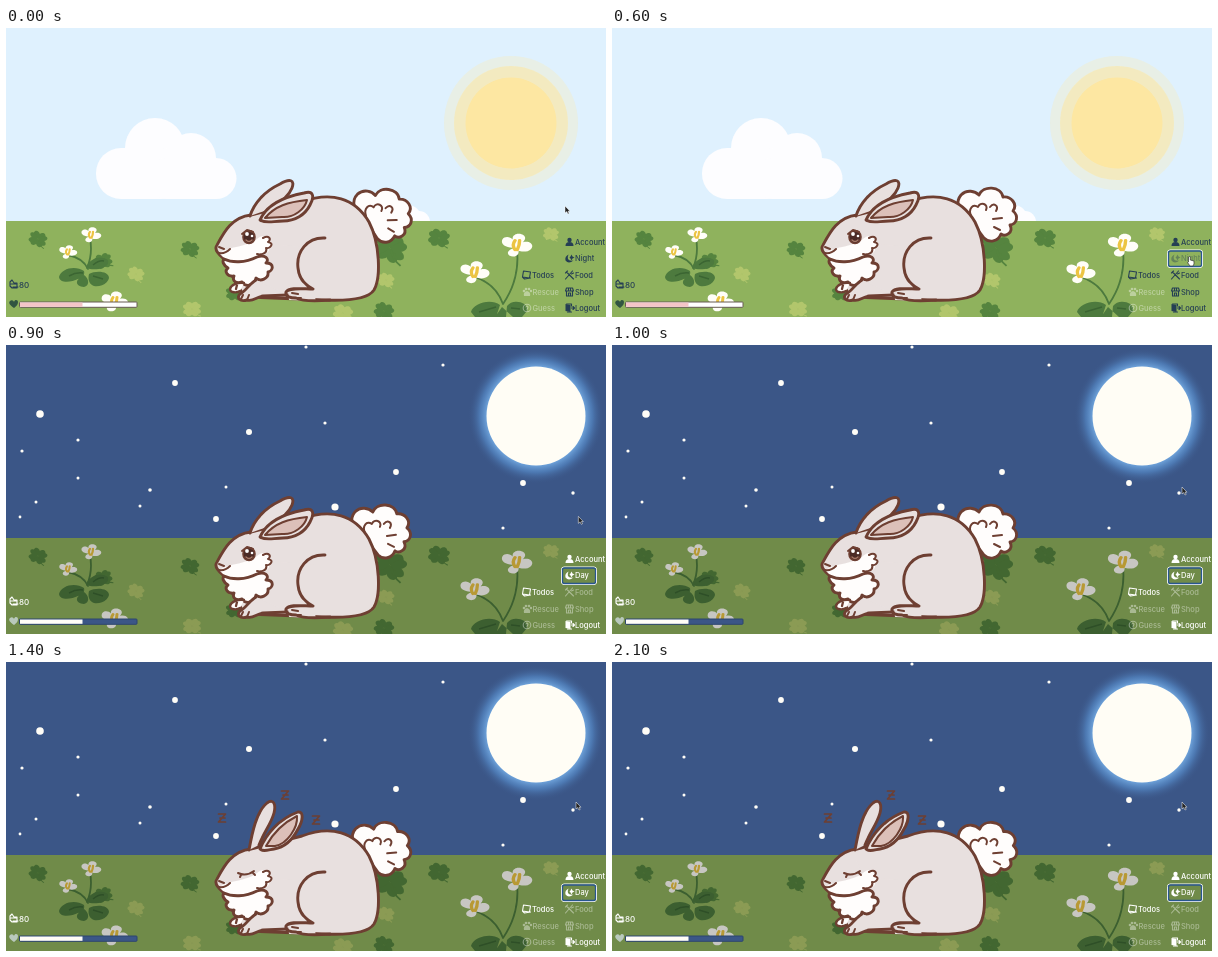
Recreate the animation shown at these times as an HTML page. Size 600x289 px, loop 2.2 s.

```html
<!DOCTYPE html>
<html lang="en">
<head>
<meta charset="utf-8">
<title>Bunny day and night</title>
<style>
  html, body { margin: 0; width: 100%; height: 100%; overflow: hidden; }
  svg { display: block; width: 100vw; height: 100vh; }
  text { font: 500 7.5px Inter, "Open Sans", sans-serif; fill: currentColor; }
  .line { fill: none; stroke: currentColor; stroke-width: 1.1; stroke-linecap: round; stroke-linejoin: round; }
  .solid { fill: currentColor; }
  .fur { fill: #e8e0df; }
  .white { fill: #fffdfc; }
  .pink { fill: #dcc0b9; }
  .thin { fill: none; stroke-width: 2; }
  .ink { stroke: #6e3f32; stroke-width: 2.9; stroke-linecap: round; stroke-linejoin: round; }
</style>
</head>
<body>
<svg viewBox="0 0 600 289" preserveAspectRatio="none">
  <defs>
    <radialGradient id="glow">
      <stop offset=".7" stop-color="#78aee5"/>
      <stop offset=".83" stop-color="#5487c4" stop-opacity=".7"/>
      <stop offset="1" stop-color="#3b5687" stop-opacity="0"/>
    </radialGradient>
    <g id="clover">
      <path id="leaf" d="M0 0C-3-2-7-4-5-7C-4-9-1-8 0-6C1-8 4-9 5-7C7-4 3-2 0 0Z"/>
      <use href="#leaf" transform="rotate(88)"/>
      <use href="#leaf" transform="rotate(180)"/>
      <use href="#leaf" transform="rotate(268)"/>
      <path d="M1 1Q3 6 8 8" fill="none" stroke="currentColor"/>
    </g>
    <g id="flower">
      <path fill="#fffef8" d="M0 1C-7 1-13-2-11-8C-9-12-4-11-2-8C-3-14 4-16 8-12C10-9 8-7 7-5C13-7 17-2 14 2C11 6 5 5 3 4C4 9-1 12-5 9C-8 6-5 2 0 1Z"/>
      <path d="M0-7Q-3-2 0 3M4-7Q4-2 2 3" fill="none" stroke="#ecc442" stroke-width="3" stroke-linecap="round"/>
    </g>
  </defs>

  <rect id="sky" width="600" height="193"/>
  <g id="daySky">
    <g fill="#fde7a2">
      <circle cx="505" cy="95" r="67" opacity=".27"/>
      <circle cx="505" cy="95" r="57" opacity=".55"/>
      <circle cx="505" cy="95" r="45.5"/>
    </g>
    <g fill="#fdfdff">
      <circle cx="149" cy="120" r="30"/>
      <circle cx="185" cy="130" r="25"/>
      <rect x="90" y="120" width="90" height="51" rx="25"/>
      <rect x="140" y="130" width="90.500" height="41" rx="20.500"/>
      <circle cx="402" cy="190" r="13"/>
      <circle cx="413" cy="194" r="11"/>
    </g>
  </g>
  <g id="nightSky">
    <circle cx="530" cy="71" r="68" fill="url(#glow)"/>
    <circle cx="530" cy="71" r="49.500" fill="#fffdf5"/>
    <g id="stars" fill="#fffdf7"></g>
  </g>

  <rect y="193" width="600" height="96" fill="#8fb25d"/>
  <g id="meadow"></g>
  <g fill="none" stroke="#4d7a3e" stroke-width="1.8" stroke-linecap="round">
    <path d="M62 227Q77 230 82 241M84 210Q87 226 81 240M469 249Q490 256 497 276M511 222Q514 251 497 276"/>
  </g>
  <g fill="#4d7a3e">
    <path d="M78 243C70 237 55 240 53 249C54 256 66 254 72 251C77 250 79 247 78 243ZM80 240C82 231 95 226 102 232C104 240 92 242 84 241ZM83 246C90 242 103 243 103 250C101 257 93 259 88 258C82 256 82 250 83 246ZM76 249C68 252 70 259 78 259C84 258 83 250 78 247Z"/>
    <path d="M494 277C485 270 467 275 465 284L469 289H490ZM501 278C507 270 523 274 521 283L516 289H500ZM496 279L489 289H507Z"/>
  </g>
  <g fill="none" stroke="#3b6532" stroke-width="1.500">
    <path d="M63 248Q70 244 77 245M87 237Q93 232 98 233M87 248L97 251M473 284L490 279M505 280L514 281"/>
  </g>
  <g id="flowers"></g>
  <rect id="shade" y="193" width="600" height="96" opacity=".22"/>

  <g class="ink">
    <g id="tail">
      <path class="white" d="M357 190C346 184 343 174 349 167C355 161 363 163 367 167C371 157 389 158 391 169C399 168 406 176 401 183C407 188 405 196 398 197C402 205 393 209 389 206C386 214 377 215 372 210Z"/>
      <path class="thin" d="M359 188C356 181 361 175 366 179C368 173 377 176 374 182M378 179C382 174 387 178 384 183M381 191L390 190M382 199L388 202"/>
    </g>
    <path class="fur" d="M296 174C325 163 349 170 363 194C374 215 375 250 368 262C362 271 340 273 318 272L240 269C232 262 225 245 217 230C212 226 208 221 211 217C218 204 226 189 245 187Z"/>
    <path class="fur" stroke="none" d="M242 190L300 176L310 220L250 215Z"/>
    <g id="earsDown">
      <path class="fur" d="M244 188C248 175 259 163 274 156C284 150 289 152 286 160C283 168 274 175 264 181"/>
      <path class="fur" d="M254 192C260 178 277 169 298 165C307 162 309 168 304 177C299 187 289 193 277 193C267 193 260 196 254 192Z"/>
      <path class="pink thin" style="fill:#dcc0b9" d="M259 190C269 178 282 174 301 172C299 181 288 190 276 189Z"/>
    </g>
    <g id="earsUp">
      <path class="fur" d="M243 188C246 172 250 150 261 141C268 136 270 143 268 151C265 162 258 170 253 183"/>
      <path class="fur" d="M254 187C260 172 273 157 292 150C298 149 297 159 292 167C287 177 280 185 268 187C262 188 257 190 254 187Z"/>
      <path class="thin" style="fill:#dcc0b9" d="M260 184C267 171 277 161 291 154C292 166 281 182 269 184Z"/>
    </g>
    <path class="white" stroke="none" d="M213 225C224 218 242 219 251 211C256 206 262 208 262 212C268 213 265 219 263 220C264 225 257 227 253 227C245 233 226 235 217 229Z"/>
    <path class="thin" d="M257 210C263 207 266 211 262 214C269 215 264 221 260 220C262 226 254 227 251 226M213 225Q219 226 224 221M213 219L218 221"/>
    <path class="white" d="M218 231C226 235 239 235 251 229C259 226 264 231 260 235C269 235 267 243 262 244C263 251 254 254 250 250C248 259 239 259 236 254C230 256 226 253 228 248C221 249 218 243 222 240C217 237 216 233 218 231Z"/>
    <path class="white" style="stroke-width:2.300" d="M238 255C231 254 225 257 224 261C224 265 231 265 234 263M231 257L230 261"/>
    <path class="fur" d="M250 252C242 257 240 263 234 266C230 270 234 274 241 272C247 274 250 269 257 268L282 267"/>
    <path class="thin" d="M237 267L235 271M243 267L241 272"/>
    <path class="fur" stroke="none" d="M307 261L282 262L283 272L310 273Z"/>
    <path fill="none" d="M319 210C301 209 290 224 292 240C293 251 299 257 307 261C297 261 283 259 280 264C279 269 285 270 290 270C298 274 312 273 324 272"/>
    <path class="thin" d="M286 265L292 266M289 270L295 270"/>
    <g id="eyeOpen">
      <ellipse cx="243" cy="209" rx="6" ry="6.500" fill="#4b2b26" stroke-width="1.600"/>
      <path class="thin" d="M236 206L241 202L247 204"/>
      <g fill="#fff" stroke="none"><circle cx="241" cy="206" r="1.900"/><circle cx="246" cy="208" r="1.300"/></g>
      <path d="M240 212Q243 215 246 212" fill="none" stroke="#a67766" stroke-width="1.400"/>
    </g>
    <path id="eyeShut" class="thin" d="M232 211Q240 215 248 209M235 213L234 215M247 211L249 213"/>
  </g>
  <g id="sleep" class="ink" style="stroke-width:1.700" fill="none"></g>

  <g id="hud">
    <text x="13" y="259.500" style="font-size:8px">80</text>
    <path class="line" d="M4 254L6 252L8 255H11V260H6L4 258ZM5 256H10M7 259H12"/>
    <path id="heart" class="solid" d="M8 280C4 277 2 275 4 273C6 271 8 273 8 274C9 271 12 272 12 274C12 277 10 278 8 280Z"/>
    <rect id="barBack" x="13.500" y="274" width="117.500" height="5.300" rx=".8" stroke-width="1"/>
    <rect id="barFill" x="14" y="274.500" width="62.500" height="4.300"/>
  </g>
  <g id="focus" fill="none">
    <rect x="555.500" y="222" width="35" height="17.500" rx="2.500" stroke="#fff" stroke-width="1"/>
    <rect x="556.500" y="223" width="33" height="15.500" rx="2" stroke="#28568f" stroke-width="1.300"/>
  </g>
  <g id="menu"></g>

  <path id="arrow" d="M0 0V7L1.700 5.600L3 8L4.200 7.400L3 5.200H5Z" fill="#222" stroke="#fff" stroke-width=".5"/>
  <path id="hand" d="M0 0Q1.300-1 1.800 0V3L5.500 4V7L4.500 9H1.500L-1 5.500L0 5Z" fill="#fff" stroke="#333" stroke-width=".7"/>
</svg>
<script>
const LOOP = 2200, STEP = 100;
const $ = id => document.getElementById(id);
const show = (id, on) => $(id).style.display = on ? "" : "none";
const set = (id, attrs) => Object.entries(attrs).forEach(([k, v]) => $(id).setAttribute(k, v));

const stars = [
  [34,69,3.8], [16,106,1.6], [72,95,1.6], [72,133,1.5], [30,157,1.5], [14,172,1.4], [169,38,2.9],
  [144,145,1.8], [134,161,1.5], [243,87,3], [220,142,1.5], [210,174,2.9], [300,2,1.6], [319,78,1.6],
  [329,162,3.6], [390,127,2.9], [437,20,1.6], [517,138,2.9], [497,183,1.6], [567,148,1.7]
];
$("stars").innerHTML = stars.map(([x, y, r]) => `<circle cx="${x}" cy="${y}" r="${r}"/>`).join("");

const place = (ref, color) => ([x, y, size, turn = 0]) =>
  `<use href="#${ref}" transform="translate(${x} ${y}) rotate(${turn}) scale(${size} ${size * .82})" fill="${color}" color="${color}"/>`;
const dark = [[32,211,1.1,20], [184,221,1.1,15], [97,233,1.1,-15], [384,220,2,20], [433,210,1.3,10], [378,283,1.2,20], [229,265,1.1,0]];
const pale = [[130,246,1,20], [186,281,1.1,0], [337,285,1.2,15], [545,206,.95,10], [380,252,1,15]];
$("meadow").innerHTML = dark.map(place("clover", "#55843f")).join("") + pale.map(place("clover", "#b2c66c")).join("");
$("flowers").innerHTML = [[61,225,.68], [84,208,.75], [107,275,1], [509,219,1.15], [467,246,1.1]].map(place("flower", "#fff")).join("");

// Icons are drawn around (0, 0) and placed left of their label.
const icons = {
  person: '<circle class="solid" cy="-2" r="2.200"/><path class="solid" d="M-4 4Q-4 0 0 0Q4 0 4 4Z"/>',
  moon: '<path class="solid" d="M-1-4Q-4 3 4 2Q-1 6-4 2Q-5-2-1-4ZM2-4L3-2L5-1L3 0L2 2L1 0L0-1L1-2Z"/>',
  food: '<path class="line" stroke-width="1.500" d="M-3-3L4 4M3-4L-4 4M-4-2L-2-4M2-1L4-2"/>',
  shop: '<path class="line" d="M-3-4H3L4-1H-4ZM-3-1V4H3V-1M-1 4V1H1V4M-1-4V-1M1-4V-1"/>',
  door: '<path class="solid" d="M-4-4L1-3V4L-4 3Z"/><path class="line" d="M-3-4H2V-2M2 4H-2M2 0H5L3.500-1.500M5 0L3.500 1.500"/>',
  todo: '<path class="line" d="M-3-4L4-3L3 3L-4 2ZM-4 2L-2 4L4 3"/>',
  paw: '<path class="solid" d="M-3 4Q-4 0 0-1Q4 0 3 4Z"/><g class="solid"><circle cx="-3" cy="-1" r="1.300"/><circle cx="-1" cy="-3" r="1.300"/><circle cx="2" cy="-3" r="1.300"/><circle cx="4" cy="-1" r="1.200"/></g>',
  guess: '<circle class="line" r="3.800"/><path class="line" d="M-1-1Q0-3 1-1Q1 0 0 1V2"/>'
};
const items = [
  ["account", "Account", 569, 214, "person"], ["mode", "Night", 569, 230.5, "moon"],
  ["food", "Food", 569, 247, "food"], ["shop", "Shop", 569, 264, "shop"], ["logout", "Logout", 569, 280, "door"],
  ["todos", "Todos", 526, 247, "todo"], ["rescue", "Rescue", 526.5, 264, "paw"], ["guess", "Guess", 526.5, 280, "guess"]
];
$("menu").innerHTML = items.map(([id, label, x, y, icon]) =>
  `<g id="${id}"><g transform="translate(${x - 5.5} ${y})">${icons[icon]}</g><text x="${x}" y="${y + 2.8}">${label}</text></g>`).join("");
const modeLabel = $("mode").querySelector("text");

const zs = [[216,156, 208,173, -60], [279,133, 285,132, -12], [310,158, 320,152, 25]];
$("sleep").innerHTML = zs.map(() => '<path d="M-3.500-4H3.500L-3.500 4H3.500M-2 0H3"/>').join("");

// Keys are [time, ...values]; values are linear between them.
function track(keys, t) {
  const i = keys.findIndex(k => k[0] > t);
  if (i < 0) return keys.at(-1).slice(1);
  const a = keys[i - 1], b = keys[i], p = (t - a[0]) / (b[0] - a[0]);
  return a.slice(1).map((v, j) => v + (b[j + 1] - v) * p);
}
const pointerKeys = [[0,559,178], [100,559,179], [500,576,228], [700,577,230], [1000,570,142], [1400,570,140]];
const tailKeys = [[0,4], [600,0], [700,-1], [1000,0], [1400,1]];

function update(time) {
  const t = Math.floor(time % LOOP / STEP) * STEP;
  const night = t >= 700, settled = t >= 800, asleep = t >= 1300;

  set("sky", { fill: night ? "#3b5687" : "#dff1fe" });
  show("daySky", !settled);
  show("nightSky", settled);
  show("shade", settled);
  show("earsDown", !asleep);
  show("eyeOpen", !asleep);
  for (const id of ["earsUp", "eyeShut", "sleep"]) show(id, asleep);
  set("tail", { transform: `rotate(${track(tailKeys, t)[0]} 362 202)` });

  const sway = (1 - Math.cos((t - 1400) / 700 * 2 * Math.PI)) / 2;
  zs.forEach(([x, y, endX, endY, turn], i) => $("sleep").children[i].setAttribute("transform",
    `translate(${x + (endX - x) * sway} ${y + (endY - y) * sway}) rotate(${turn * sway})`));

  const color = night ? "#fff" : "#253e54";
  set("menu", { color });
  set("hud", { color });
  set("heart", { fill: night ? (settled ? "#b9c9bd" : "#8d9d83") : "#315541", style: "fill:inherit" });
  $("heart").style.fill = night ? (settled ? "#b9c9bd" : "#8d9d83") : "#315541";
  set("barBack", { fill: night ? "#3b5687" : "#fff", stroke: night ? "#2d456f" : "#665b52" });
  set("barFill", { fill: night ? (settled ? "#fffdf7" : "#d5edfa") : "#f4c5c7" });
  modeLabel.textContent = night ? "Day" : "Night";
  set("mode", { opacity: t >= 500 && !night ? .4 : 1 });
  for (const id of ["food", "shop"]) set(id, { opacity: night ? .4 : 1 });
  for (const id of ["rescue", "guess"]) set(id, { opacity: .4, color: "#fff" });
  show("focus", t >= 600);

  const [x, y] = track(pointerKeys, t), over = y > 222;
  show("arrow", !over);
  show("hand", over);
  set(over ? "hand" : "arrow", { transform: `translate(${x} ${y})` });
}

const start = performance.now();
function tick() {
  update(performance.now() - start);
  requestAnimationFrame(tick);
}
tick();
</script>
</body>
</html>
```
